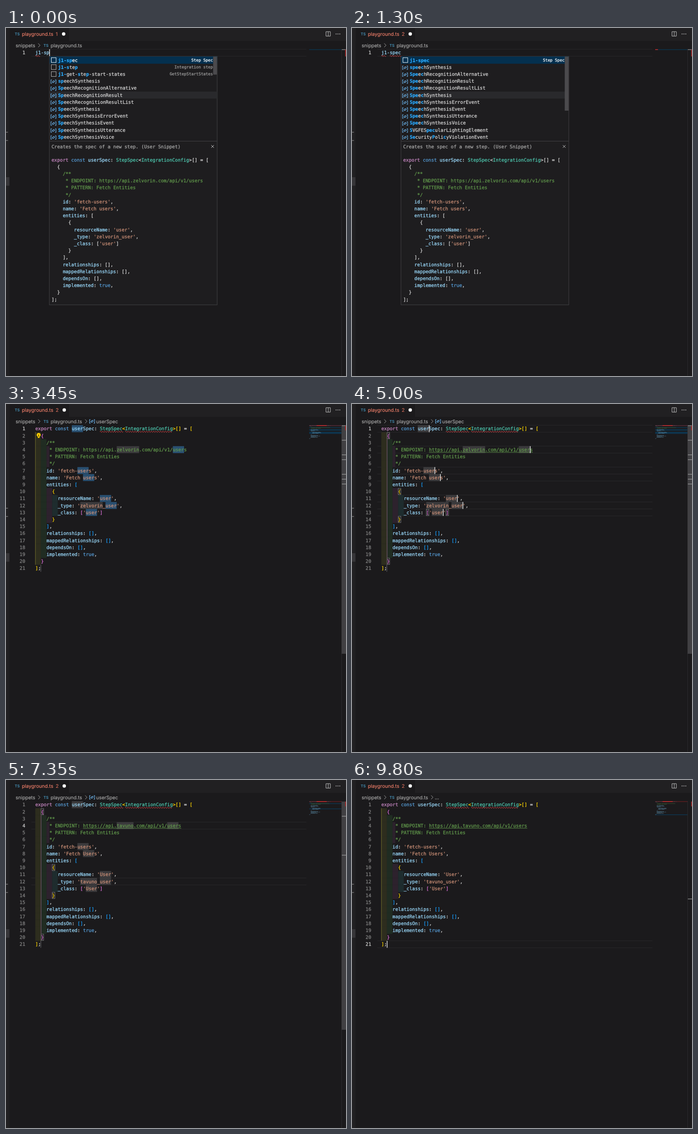
An HTML page for the animation above (9.85 s loop, 739x758 px).

```html
<!DOCTYPE html>
<html lang="en">
<head>
<meta charset="utf-8">
<title>Snippet editor</title>
<style>
html, body { margin: 0; width: 100%; height: 100%; overflow: hidden; background: #1b1a1c; }
svg { display: block; }
text { white-space: pre; text-rendering: geometricPrecision; font: 10.13px "DejaVu Sans Mono", monospace; }
text, tspan { fill: currentColor; stroke: currentColor; stroke-width: .28px; }
.ui { font: 10.6px Inter, sans-serif; stroke-width: .15px; }
.ts { font: 600 8.2px Inter, sans-serif; stroke: none; }
.detail { font-size: 8.7px; }
.hit { color: #2aaaff; font-weight: bold; }
</style>
</head>
<body>
<svg id="stage" width="739" height="758" viewBox="0 0 739 758"></svg>
<script>
const LOOP = 9850, CW = 6.1, LH = 15.2, X0 = 63.7, Y0 = 46.2, BASE = 11.1;
const VENDOR = 'zelvorin', CHOICE = 'tavuno';
const INSERT = 2850, DONE = 7800;

const typing = [[0, 'sp'], [300, 'spe'], [500, 'spec']];
// time, user field, vendor field, active field, whole field selected
const edits = [
  [INSERT, 'user', VENDOR, 1, true],
  [4100, 'u', VENDOR, 1], [4250, 'us', VENDOR, 1], [4400, 'use', VENDOR, 1], [4600, 'user', VENDOR, 1],
  [5300, 'user', VENDOR, 2, true],
  ...[5700, 5850, 6000, 6200, 6350, 6550].map((t, i) => [t, 'user', CHOICE.slice(0, i + 1), 2]),
  [DONE, 'user', CHOICE, 0]
];

const words = ['speechSynthesis', 'SpeechRecognitionAlternative', 'SpeechRecognitionResult',
  'SpeechRecognitionResultList', 'SpeechSynthesis', 'SpeechSynthesisErrorEvent',
  'SpeechSynthesisEvent', 'SpeechSynthesisUtterance', 'SpeechSynthesisVoice'];
const snippets = [['j1-spec', 'Step Spec'], ['j1-step', 'Integration step'],
  ['j1-get-step-start-states', 'GetStepStartStates']];

const colors = {
  comment: '#629a4c', string: '#ce9178', flow: '#c586c0', key: '#569cd6',
  type: '#4ec9b0', prop: '#9cdcfe', plain: '#d8d8d8'
};
const rainbow = ['#ffd700', '#da70d6', '#179fff'];
const indents = ['#2d2d1e', '#202c22', '#2d222d', '#1e2c2e'];

const stage = document.getElementById('stage');
const esc = s => s.replace(/&/g, '&amp;').replace(/</g, '&lt;');
const rect = (x, y, w, h, fill, extra = '') =>
  `<rect x="${x}" y="${y}" width="${w}" height="${h}" fill="${fill}" ${extra}/>`;
const path = (d, stroke, w = 1, extra = '') =>
  `<path d="${d}" fill="none" stroke="${stroke}" stroke-width="${w}" ${extra}/>`;
const text = (x, y, s, color, extra = '') => `<text x="${x}" y="${y}" color="${color}" ${extra}>${esc(s)}</text>`;
const circle = (x, y, r, fill) => `<circle cx="${x}" cy="${y}" r="${r}" fill="${fill}"/>`;
const at = (table, t) => table.filter(row => row[0] <= t).pop();
const lineTop = n => Y0 + (n - 1) * LH;
const colX = c => X0 + c * CW;
const blinkOn = dt => dt % 1000 < 500;

function squiggle(col, len, y) {
  const n = Math.round(len * CW / 5.07);
  return path(`M${colX(col)} ${y}q1.27 -2.4 2.535 0` + 't2.535 0'.repeat(n * 2 - 1), '#f14c4c');
}

function symbol(x, y) {
  return path('M2.7 0H.6V7.6H2.7M9.6 0H11.7V7.6H9.6M3.2 4.5L6.6 1.5L9 3.1L5.6 6.1ZM3.2 4.5L5.6 6.1', '#6fb8f0', 1.1,
    `transform="translate(${x} ${y})"`);
}

// Field 1 is wrapped in «», field 2 in ‹›.
function makeDoc(user, vendor, capital) {
  const u = `«${user}»`, v = `‹${vendor}›`;
  const U = capital ? `«${user[0].toUpperCase()}${user.slice(1)}»` : u;
  const raw = `export const ${u}Spec: StepSpec<IntegrationConfig>[] = [
  {
    /**
     * ENDPOINT: https://api.${v}.com/api/v1/${u}s
     * PATTERN: Fetch Entities
     */
    id: 'fetch-${u}s',
    name: 'Fetch ${U}s',
    entities: [
      {
        resourceName: '${U}',
        _type: '${v}_${u}',
        _class: ['${U}']
      }
    ],
    relationships: [],
    mappedRelationships: [],
    dependsOn: [],
    implemented: true,
  }
];`;
  const fields = [];
  const lines = raw.split('\n').map((src, i) => {
    let out = '', open = 0;
    for (const c of src) {
      if (c === '«' || c === '‹') open = out.length;
      else if (c === '»' || c === '›')
        fields.push({ line: i + 1, col: open, len: out.length - open, id: c === '»' ? 1 : 2 });
      else out += c;
    }
    return out;
  });
  return { lines, fields };
}

function kindOf(tok, rest) {
  if (tok[0] === "'") return 'string';
  if (tok === 'export') return 'flow';
  if (tok === 'const' || tok === 'true') return 'key';
  if (/^(StepSpec|IntegrationConfig)$/.test(tok)) return 'type';
  return rest[0] === ':' ? 'prop' : 'plain';
}

function drawCode(lines, x, top, paired) {
  let depth = 0;
  return lines.map((line, i) => {
    const body = line.trimStart(), indent = line.length - body.length;
    let spans = '';
    if (/^(\/\*|\*)/.test(body)) {
      spans = `<tspan color="${colors.comment}">${esc(body)}</tspan>`;
    } else {
      for (const m of body.matchAll(/'[^']*'|\w+|\s+|./g)) {
        const tok = m[0];
        let color = colors[kindOf(tok, body.slice(m.index + tok.length))];
        if (paired && /^[[{<\]}>]$/.test(tok)) {
          const opens = '[{<'.includes(tok);
          if (!opens) depth--;
          color = rainbow[depth % 3];
          if (opens) depth++;
        }
        spans += `<tspan color="${color}">${esc(tok)}</tspan>`;
      }
    }
    return `<text x="${x + indent * CW}" y="${top + i * LH + BASE}">${spans}</text>`;
  }).join('');
}

function drawFrame(t) {
  const count = t < 1000 ? 1 : 2;
  let s = rect(0, 0, 739, 28, '#212022') + rect(8, 0, 129, 28, '#1b1a1c')
    + rect(0, 0, 7.5, 758, '#212022') + rect(0, 325, 7.5, 18.5, '#363538');
  for (const y of [227, 245]) s += circle(.6, y, .8, '#c8c8c8') + circle(3.2, y, .8, '#c8c8c8');
  s += text(19, 16, 'TS', '#4796bd', 'class="ts"')
    + text(34.5, 17.3, 'playground.ts', '#ef7f6a', 'class="ui"')
    + text(108, 17.3, String(count), '#d9705d', 'class="ui"')
    + circle(count < 2 ? 125.3 : 126.6, 13, 3.7, '#fff')
    + path('M695.5 8H705V17.7H695.5ZM700.3 8V17.7', '#c5c5c5');
  for (const x of [717.5, 721.5, 725.5]) s += circle(x, 13, 1, '#c5c5c5');
  const crumb = '#a9a9a9', chevron = x => path(`M${x} 33.5l4 4.2l-4 4.2`, crumb);
  s += text(21, 41.5, 'snippets', crumb, 'class="ui"') + chevron(70)
    + text(81.5, 40.5, 'TS', '#4796bd', 'class="ts"')
    + text(97, 41.5, 'playground.ts', crumb, 'class="ui"');
  if (t >= 3100) {
    s += chevron(172);
    s += t < DONE ? symbol(181, 34) + text(196, 41.5, 'userSpec', crumb, 'class="ui"')
      : text(180, 41.5, '…', crumb, 'class="ui"');
  }
  return s + path('M729.5 46V758', '#343336', 1, 'stroke-dasharray="2 1"');
}

const lineNumber = (n, active) =>
  text(41.8, lineTop(n) + BASE, String(n), active ? '#d0d0d0' : '#858585', 'text-anchor="end"');
const currentLine = n => path(`M55 ${lineTop(n)}H653M55 ${lineTop(n) + LH}H653`, '#29282b');
const cursor = (line, col) => rect(colX(col) - .3, lineTop(line), 1.5, LH, '#e4e4e4');
const rulerMark = n => rect(730, 46.5 + (n - 1) * 10.6, 9, 1.2, '#a0a0a0');
const errorMark = h => rect(737.2, 47, 1.8, h, '#a02a2a');

// Marks the letters of a query in order.
function matched(label, query) {
  let i = 0;
  return [...label].map(c => {
    if (i < query.length && c.toLowerCase() === query[i]) {
      i++;
      return `<tspan class="hit">${c}</tspan>`;
    }
    return c;
  }).join('');
}

const pristine = makeDoc('user', VENDOR, false);

function drawPopup(query, x) {
  const first = query === 'sp';
  const rows = first
    ? [...snippets.map(([l, d]) => [l, 'j1-' + query, d]), ...words.map(w => [w, query])]
    : [[snippets[0][0], 'j1-' + query, snippets[0][1]], ...words.map(w => [w, query]),
      ['SVGFESpecularLightingElement', query], ['SecurityPolicyViolationEvent', 'sepc']];
  const top = 62.5;
  let s = rect(x, top - .5, 364.8, 541, '#1e1d1f', 'stroke="#434245"')
    + rect(x + .5, top - .5, 364, LH + .6, '#04304f')
    + rect(x + .5, top + 5 * LH, 364, LH, '#29292c')
    + rect(x + 356, top, 8.3, first ? 39 : 117.5, '#4b4a4d');
  rows.forEach(([label, q, detail], i) => {
    const y = top + i * LH, tone = i ? '#d8d8d8' : '#fff';
    if (detail) {
      s += rect(x + 4.3, y + 2.2, 10.4, 10.4, 'none', `stroke="${i ? '#b5b5b5' : '#fff'}"`)
        + text(x + 355.6, y + 10.3, detail, i ? '#9c9c9c' : '#fff', 'class="detail" text-anchor="end"');
    } else s += symbol(x + 2.8, y + 5);
    s += `<text x="${x + 19}" y="${y + BASE}" color="${tone}">${matched(label, q)}</text>`;
  });
  const cx = x + 354.8;
  return s + path(`M${x} 246.5h364.8`, '#434245')
    + text(x + 4.8, 261.6, 'Creates the spec of a new step. (User Snippet)', '#a9a9a9')
    + path(`M${cx - 3} 255l6 6m0 -6l-6 6`, '#c5c5c5')
    + drawCode(pristine.lines, x + 4.8, 279.4, false);
}

function drawTyping(t) {
  const [time, query] = at(typing, t), word = 'j1-' + query, x = colX(word.length);
  const checked = t >= 1000;
  let s = currentLine(1) + lineNumber(1, true)
    + text(X0, Y0 + BASE, word, '#9cdcfe') + squiggle(0, 2, 61);
  if (checked) s += squiggle(3, 4, 61);
  if (blinkOn(t - time)) s += cursor(1, word.length);
  s += rect(659, 46.4, 70, 1.4, '#0b3652');
  if (checked) s += rect(659, 46.2, 6, 1.6, '#c42b2b');
  return s + rulerMark(1) + errorMark(15) + drawPopup(query, x);
}

function drawIndents(lines) {
  return lines.map((line, i) => {
    const indent = line.search(/\S/);
    let s = '';
    for (let c = 0; c < indent; c += 2)
      s += rect(colX(c), lineTop(i + 1), Math.min(2, indent - c) * CW, LH + .1, indents[c / 2]);
    return s;
  }).join('');
}

function drawMinimap(lines, marked) {
  const rowY = i => 46.5 + i * 1.42;
  let s = marked.map(n => rect(659, rowY(n - 1), 70, 1.4, '#0d3853')).join('');
  lines.forEach((line, i) => {
    const shade = /^\s*(\/\*|\*)/.test(line) ? '#3f6434' : '#55819a';
    for (const m of line.matchAll(/\S+/g))
      s += rect(659 + m.index * .84, rowY(i) + .2, m[0].length * .84, .9, shade, 'opacity=".75"');
  });
  return s + rect(659, 46.3, 70, 1.4, '#7a2024', 'opacity=".75"') + rect(675, 46.2, 22, 1.6, '#c42b2b');
}

function drawSnippet(t) {
  const [time, user, vendor, field, selecting] = at(edits, t);
  const { lines, fields } = makeDoc(user, vendor, field !== 1);
  const live = fields.filter(f => f.id === field);
  const caretLines = field ? live.map(f => f.line) : [21];
  const active = caretLines[0], nested = field && !selecting;
  let s = selecting ? '' : caretLines.map(currentLine).join('');
  s += drawIndents(lines);
  s += nested ? path(`M${colX(2) + .3} ${lineTop(3)}V${lineTop(20)}`, '#86607f')
    : path(`M${X0 + .3} ${lineTop(2)}V${lineTop(21)}`, '#77702a');

  if (field) for (const f of fields) {
    const on = selecting && f.id === field;
    s += rect(colX(f.col), lineTop(f.line), f.len * CW, LH, on ? '#294f70' : '#3b3a3c');
  }
  if (nested) {
    const pairs = [[2, 2], [10, 6], [14, 6], [20, 2]];
    if (field === 1) pairs.push([13, lines[12].indexOf('[')], [13, lines[12].indexOf(']')]);
    for (const [n, c] of pairs)
      s += rect(colX(c) + .2, lineTop(n) + .8, CW - .4, LH - 1.6, 'none', 'stroke="#858585" stroke-width=".9"');
  }
  lines.forEach((_, i) => s += lineNumber(i + 1, i + 1 === active));
  s += drawCode(lines, X0, Y0, true);

  if (t >= 4100) {
    const from = lines[3].indexOf('https');
    s += path(`M${colX(from)} ${lineTop(4) + 13.3}H${colX(lines[3].length)}`, colors.comment, .9);
  }
  if (t >= 3300) {
    for (const name of ['StepSpec', 'IntegrationConfig'])
      s += squiggle(lines[0].indexOf(name), name.length, 60.5);
  }
  if (field === 1 && selecting && t >= 3150) {
    s += circle(71, 67.3, 4.3, '#ffcc00') + rect(69, 70.5, 4, 3.3, '#ffcc00') + rect(70.3, 66.5, 1.4, 4.5, '#3a3012');
  }
  if (field) s += rect(colX(2) - .7, lineTop(21), 1, LH, '#6c6b6e');
  if (!selecting && blinkOn(t - time)) {
    s += field ? live.map(f => cursor(f.line, f.col + f.len)).join('') : cursor(21, 2);
  }
  s += drawMinimap(lines, caretLines);
  if (field) s += rect(729.5, 47, 9.5, 497, '#414043');
  return s + caretLines.map(rulerMark).join('') + errorMark(10.5);
}

let shown = '';
const start = performance.now();
function render() {
  const t = (performance.now() - start) % LOOP;
  const next = drawFrame(t) + (t < INSERT ? drawTyping(t) : drawSnippet(t));
  if (next !== shown) stage.innerHTML = shown = next;
  requestAnimationFrame(render);
}
render();
</script>
</body>
</html>
```
